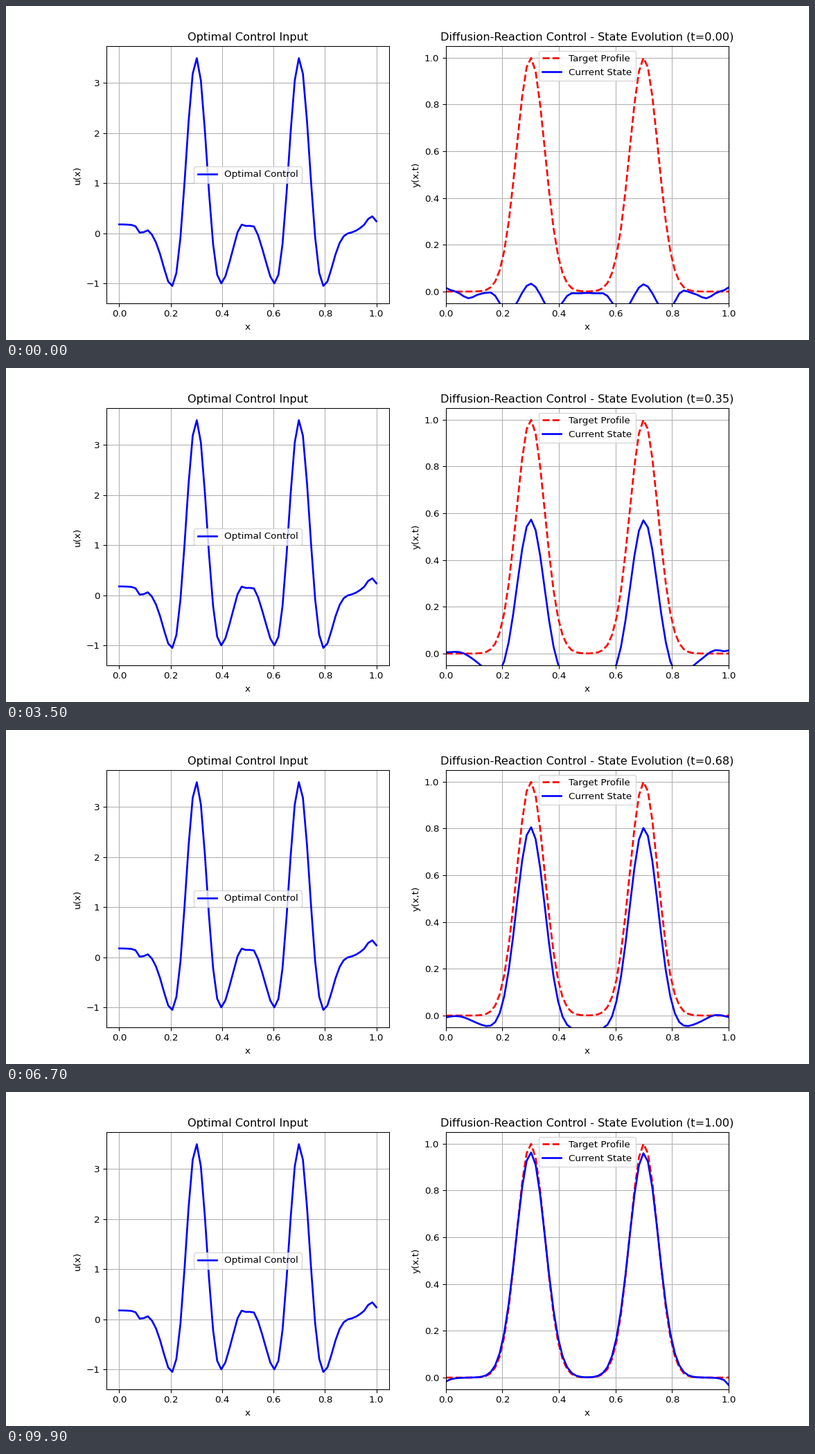
Recreate the animation shown at these times as a matplotlib script. Size 1159 by 483 pixels, loop 10000 ms.

```python
import numpy as np
import matplotlib.pyplot as plt
from matplotlib.animation import FuncAnimation

WIDTH, HEIGHT = 1159, 483
DPI = WIDTH / 12
FRAMES = 100
x = np.linspace(0, 1, 64)

plt.rcParams.update({"font.size": 10.07, "axes.titlesize": 12})


def bell(center, width):
    return np.exp(-((x - center) / width) ** 2)


def twin(width, left=1, right=1):
    """Two humps, centred on the peaks of the target profile."""
    return left * bell(.3, width) + right * bell(.7, width)


def ripple(*bumps):
    return sum(height * bell(center, width) for center, height, width in bumps)


def optimal_control():
    """Each hump counteracts reaction (G) and diffusion (-G'')."""
    u = .13 + .05 * np.cos(4 * np.pi * x)
    for center in (.3, .7):
        q = ((x - center) / .054) ** 2
        u += (.58 + 2.83 * (1 - q)) * np.exp(-q / 2)
    return u + ripple((.085, -.15, .015), (.47, .15, .02), (.525, .1, .02),
                      (.91, -.1, .035), (.98, .17, .02))


start_ripple = ripple((.08, -.028, .03), (.17, .035, .03), (.43, .03, .03),
                      (.57, .03, .03), (.83, .045, .03), (.92, -.028, .03))


def state(t):
    # The gap to the settled profile shrinks while it spreads by diffusion.
    gap = .929 * (1 - np.log1p(t / .175) / np.log1p(1 / .175))
    y = twin(np.sqrt(.0054), .963, .96) - gap * twin(np.sqrt(.0072 + .024 * t))

    y += start_ripple * np.exp(-t / .05)
    swell = np.sin(np.pi * t ** .6)
    y += swell * ripple((.05, .013, .04), (.95, .021, .035))
    y += (.016 - .033 * t) * np.exp(-x / .02)
    y += (.018 - .05 * t ** 2) * np.exp((x - 1) / .015)
    return y


fig, (ax_u, ax_y) = plt.subplots(
    1, 2, figsize=((WIDTH + 1e-4) / DPI, (HEIGHT + 1e-4) / DPI), dpi=DPI)

ax_u.plot(x, optimal_control(), "b-", lw=2, label="Optimal Control")
ax_u.set(title="Optimal Control Input", xlabel="x", ylabel="u(x)",
         xlim=(-.05, 1.05), ylim=(-1.393, 3.738))
ax_u.grid(True)
ax_u.legend(loc="center")

ax_y.plot(x, twin(np.sqrt(.005)), "r--", lw=2, label="Target Profile")
line, = ax_y.plot(x, state(0), "b-", lw=2, label="Current State")
ax_y.set(xlabel="x", ylabel="y(x,t)", xlim=(0, 1), ylim=(-.05, 1.05))
ax_y.grid(True)
ax_y.legend(loc="upper center")
title = ax_y.set_title("")


def update(step):
    t = step / (FRAMES - 1)
    line.set_ydata(state(t))
    title.set_text(f"Diffusion-Reaction Control - State Evolution (t={t:.2f})")
    return line, title


anim = FuncAnimation(fig, update, frames=FRAMES, interval=100,
                     repeat=True, repeat_delay=0, blit=False)
plt.show()
```
